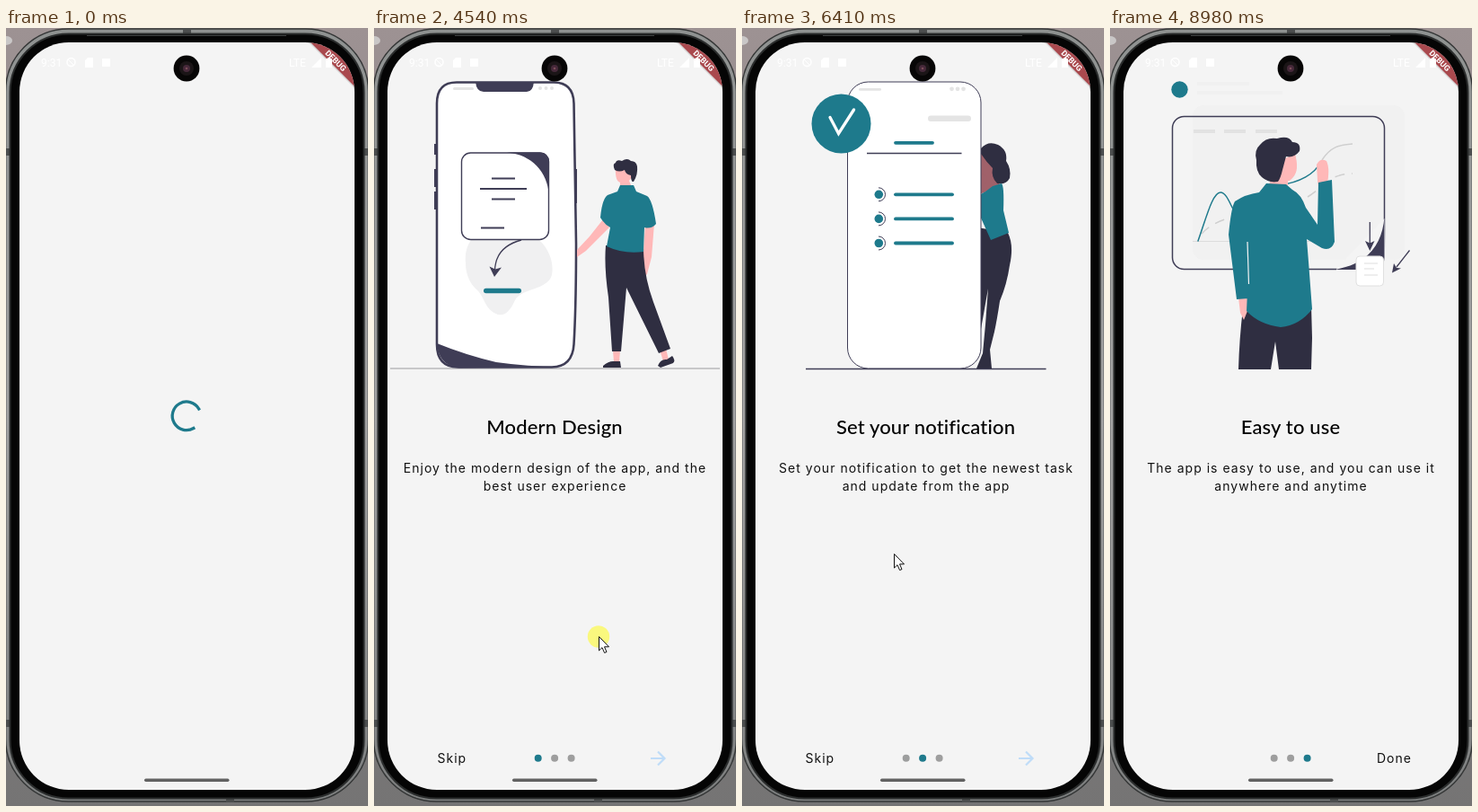
Write an HTML page that moves like this. It is 403 by 866 pixels and loops after 9.64 s.

```html
<!DOCTYPE html>
<html lang="en">
<head>
<meta charset="utf-8">
<title>Onboarding</title>
<style>
  html, body { margin: 0; width: 100%; height: 100%; overflow: hidden; background: #8a8485; }
  svg { display: block; width: 100vw; height: 100vh; }
  .title { font: 500 22px Lato, sans-serif; letter-spacing: .15px; text-anchor: middle; }
  .body { font: 400 14px Inter, sans-serif; letter-spacing: 1.02px; fill: #111; }
  .mid { text-anchor: middle; }
  .teal { fill: #1e7a8c; }
  .dark { fill: #3f3d56; }
  .navy { fill: #2f2e41; }
  .skin { fill: #ffb8b8; }
  .tan { fill: #a0616a; }
  .pale { fill: #e4e4e4; }
  .ink { stroke: #3f3d56; fill: none; }
  .tealLine { stroke: #1e7a8c; fill: none; stroke-linecap: round; }
  .grayLine { stroke: #cfcfcf; fill: none; }
</style>
</head>
<body>
<svg viewBox="0 0 403 866" preserveAspectRatio="none">
  <defs>
    <linearGradient id="desk" x2="0" y2="1">
      <stop offset="0" stop-color="#9d9293"/>
      <stop offset="1" stop-color="#757474"/>
    </linearGradient>
    <linearGradient id="metal" x2="0" y2="1">
      <stop offset="0" stop-color="#8e9190"/>
      <stop offset=".5" stop-color="#a3a3a3"/>
      <stop offset="1" stop-color="#7d7f7f"/>
    </linearGradient>
    <clipPath id="screen"><rect x="15" y="16" width="373" height="832" rx="55"/></clipPath>
  </defs>

  <!-- device -->
  <rect width="403" height="866" fill="url(#desk)"/>
  <ellipse cx="0" cy="14" rx="7" ry="5" fill="#c9c7c7"/>
  <rect x="-.5" y="1" width="404" height="860" rx="70" fill="url(#metal)" stroke="#353737" stroke-width="1.5"/>
  <path d="M197 0h9v6h-9zM0 134h5v8h-5zM398 134h5v8h-5zM0 770h5v8h-5zM398 770h5v8h-5zM245 857h9v5h-9z" fill="#4c4e4e"/>
  <rect x="4.500" y="6.500" width="394" height="851" rx="65" fill="#050505" stroke="#2b2d2d" stroke-width="2"/>
  <path d="M90 8.500h222" stroke="#3d4040"/>

  <g clip-path="url(#screen)">
    <rect x="15" y="16" width="373" height="832" fill="#f4f4f4"/>
    <path id="spinner" fill="none" stroke="#1e7a8c" stroke-width="3.300" stroke-linecap="square"/>

    <g id="home">
      <g id="pages">
        <g id="page0">
          <path d="M18 379H385" stroke="#b9b9bb" stroke-width="1.300"/>
          <path class="dark" d="M67 129h3v12h-3zM67 157h3v20h-3zM67 182h3v20h-3zM223 157h3v38h-3z"/>
          <path d="M92 60.500H200Q222 60.500 222.500 84L225 240Q225 310 222.500 352Q221 377 198 377.500H93Q70 377 70 352V84Q70 60.500 92 60.500Z" fill="#fff" stroke="#3f3d56" stroke-width="2.600"/>
          <path class="dark" d="M113 60H178Q177 71 170 71H122Q114 71 113 60ZM70 351Q102 364 136 372Q172 377 205 377L95 378.500Q72 376 70 351Z"/>
          <rect class="pale" x="88" y="66" width="23" height="3" rx="1.500"/>
          <g class="pale"><circle cx="185" cy="67" r="2"/><circle cx="191.500" cy="67" r="2"/><circle cx="198" cy="67" r="2"/></g>
          <path d="M102 262C100 240 112 224 135 225C150 222 170 222 178 232C192 240 201 258 198 275C193 292 165 289 157 303C152 314 146 321 138 319C122 313 124 299 113 290C106 283 102 273 102 262Z" fill="#f0f0f1"/>
          <rect x="97.500" y="139" width="97" height="96.500" rx="10" fill="#fff" stroke="#3f3d56" stroke-width="1.400"/>
          <path class="dark" d="M148 138.500H185Q195 139 195 149V186C193 160 176 141 148 138.500Z"/>
          <path class="ink" stroke-width="2" d="M131 167.500h26M118 179h52M131 190.500h26M119 222.500h26"/>
          <path class="ink" stroke-width="1.300" d="M164 236C145 241 135 253 134.500 270"/>
          <path class="dark" d="M128.500 265.500L134 277L142 266.500L135 268.500Z"/>
          <rect class="teal" x="122" y="289.800" width="42" height="5.400" rx="2.700"/>

          <path class="skin" d="M255 213L240 232L226 247V255L236 248L262 222ZM302 218L299 262Q294 268 296 275Q299 280 304 274L309 255L312 218ZM266 359h8l-1 13h-6zM318 358l7-1l3 12l-6 2z"/>
          <path class="skin" d="M269 155L286 154Q290 165 284 170L287 177H274V172Q268 170 269 155Z"/>
          <path class="navy" d="M268 158Q265 151 269 150Q270 146 276 148Q282 144 286 148Q292 148 293 154Q294 163 289 171Q286 172 286 164Q280 163 279 158Q273 161 268 158Z"/>
          <path class="navy" d="M258 242L300 244Q300 275 311 305L330 357L317 362L281 289L275 360H265L261 300Q256 266 258 242Z"/>
          <path class="teal" d="M274 175H289L292 182L304 187Q310 191 314 218Q309 224 301 222L300 249Q278 252 259 243L263 222Q257 219 252 211Q254 190 260 186L271 182Z"/>
          <path class="navy" d="M255 376Q261 371 266 371H274L275 378H255ZM316 376Q319 368 326 369L332 365Q336 370 333 373L319 378Z"/>
        </g>

        <g id="page1">
          <g transform="translate(-3.5)">
            <path class="ink" stroke-width="1.300" d="M71 379.500H338.500"/>
            <path class="tan" d="M262 139Q275 130 283 144Q288 158 281 164L288 176L262 186Z"/>
            <path class="navy" d="M266 134Q274 125 285 130Q296 136 294 148Q300 157 298 167Q294 175 284 173Q277 166 279 156Q272 149 266 140Z"/>
            <path class="navy" d="M262 222L296 228Q303 242 298 264Q295 285 287 304Q284 324 281 338L276 358L278 379H261L268 362L271 330L274 290L266 335L262 340Z"/>
            <path class="teal" d="M264 186Q272 182 279 176L289 173Q292 176 291 203L297 228L277 236L264 207Z"/>
            <path class="tan" d="M262 164Q271 160 273 167Q273 176 262 179Z"/>
            <rect x="117.500" y="60" width="148.500" height="319" rx="23" fill="#fff" stroke="#3f3d56"/>
            <g class="pale">
              <rect x="130" y="67" width="25" height="2.800" rx="1.400"/>
              <rect x="207" y="97.500" width="48" height="6.500" rx="3.200"/>
              <circle cx="233.500" cy="67.800" r="2.400"/><circle cx="240" cy="67.800" r="2.400"/><circle cx="246.500" cy="67.800" r="2.400"/>
            </g>
            <path class="tealLine" stroke-width="3.800" d="M171 127.800h41"/>
            <path class="ink" stroke-width="1.400" d="M139 139.500h105.500"/>
            <g id="rows"></g>
            <circle class="teal" cx="110.500" cy="106.500" r="33"/>
            <path d="M98 99.500L107.500 117.500L124.500 91" fill="none" stroke="#fff" stroke-width="3.300" stroke-linecap="round"/>
          </g>
        </g>

        <g id="page2">
          <rect x="92" y="86" width="236" height="172" rx="12" fill="#f1f1f1"/>
          <path d="M97 62h58M97 72h95" stroke="#f0f0f0" stroke-width="4"/>
          <circle class="teal" cx="77.500" cy="68.500" r="9.200"/>
          <path d="M93 115h24M127 115h24M162 115h24" stroke="#e2e2e2" stroke-width="4"/>
          <path class="grayLine" stroke-opacity=".6" d="M92 237.500h158"/>
          <path class="grayLine" stroke-width="1.500" stroke-dasharray="11 8" d="M102 229Q118 212 145 210M220 188C240 176 242 163 270 162"/>
          <path class="grayLine" stroke-width="1.500" d="M236 147C245 133 254 130 270 129"/>
          <path class="tealLine" stroke-width="1.500" d="M98 237C107 212 114 183 123 183C132 183 136 207 146 214M188 175C212 172 228 162 234 150"/>
          <rect class="ink" x="69.500" y="98.500" width="236" height="170" rx="13" stroke-width="1.500"/>
          <path d="M305.500 212L308 270L252 270V268Z" fill="#f4f4f4"/>
          <path class="dark" d="M305.500 210V256Q305 268 293 269H249C283 264 303 245 305.500 210Z"/>
          <rect x="274" y="254" width="30.500" height="33" rx="4" fill="#fff" stroke="#e0e0e0"/>
          <path class="grayLine" stroke-opacity=".7" d="M283 262h15M283 268h11M283 275h15"/>
          <path class="ink" stroke-width="1.300" d="M289.300 216V240M333.500 247.500L319 266"/>
          <path class="dark" d="M284 237L289.300 248L294.500 237L289.300 239.500ZM316 262L314 272.500L324 267.500L319 267Z"/>

          <path class="navy" d="M148 312L224 308L225 345L224 380H188L184 349L179 380H143Q144 345 148 312Z"/>
          <path class="skin" d="M143 300H154L153 315L149 325L145 317ZM231 170L230 152Q234 144 241 148Q245 156 242 173L232 176Z"/>
          <path class="skin" d="M183 151L206 140Q211 158 204 166Q200 171 198 170V179H176Z"/>
          <path class="navy" d="M163 147Q160 136 167 130Q174 121 186 123Q199 119 203 127Q213 127 211 137Q205 145 196 143L192 158Q190 167 187 171Q177 173 169 166Q162 160 163 147Z"/>
          <path class="teal" d="M174 173L196 174L203 180Q213 185 218 200L231 219L232 172L247 169L250 238Q246 249 236 245L219 235L221 260L225 313Q211 331 190 333Q166 330 152 315L155 250L154 301L141 302L132 230Q135 199 139 193Q151 185 166 183Z"/>
          <path d="M153 238L154.500 285" stroke="#f4f4f4" stroke-width="1.200"/>
        </g>
      </g>

      <g id="dots"></g>
      <g id="skip">
        <text class="body" x="70.500" y="818">Skip</text>
        <path d="M308 813h15M316 805.500l7.500 7.500l-7.500 7.500" fill="none" stroke="#bfdcf8" stroke-width="2.200"/>
      </g>
      <text id="done" class="body" x="297" y="818">Done</text>
    </g>

    <!-- system overlay -->
    <path d="M333 10L394 71V49L355 10Z" fill="#000" opacity=".12" transform="translate(-1 1)"/>
    <path d="M333 10L394 71V52L352 10Z" fill="#a9494e"/>
    <g fill="#fff">
      <text x="39" y="42.500" font-family="Roboto, sans-serif" font-size="12">9:31</text>
      <text x="315" y="42.500" font-family="Roboto, sans-serif" font-size="12">LTE</text>
      <circle cx="72.500" cy="38" r="4.500" fill="none" stroke="#fff" stroke-width="1.500"/>
      <path d="M69 35l7 7" stroke="#fff"/>
      <path d="M88 36l3-3h6v11h-9zM107 34h9v9h-9zM351 33v11h-11zM356 34h2v-1h3v1h2v10h-7z"/>
      <text transform="translate(367 36.500) rotate(45)" y="3" class="mid" font-family="Roboto, sans-serif" font-size="9" font-weight="700">DEBUG</text>
    </g>
    <rect x="154" y="835.500" width="94.500" height="3.500" rx="1.700" fill="#626262"/>
  </g>

  <circle cx="201" cy="45" r="14.400" fill="#070606"/>
  <circle cx="201" cy="45" r="8" fill="#1b1517"/>
  <circle cx="201" cy="45" r="4" fill="#46293a"/>
  <circle cx="201" cy="45" r="1.300" fill="#7a4c58"/>

  <g id="cursor">
    <circle id="press" r="12.200" fill="#faf87e"/>
    <path d="M.5 0V15.500L4 12.200L6.600 18L9 17L6.500 11.300H11.500Z" fill="#fff" stroke="#111"/>
  </g>
</svg>

<script>
const LOOP = 9640, STEP = 69.3, PITCH = 373.5, CX = 201;
const $ = id => document.getElementById(id);
const clamp = (v, lo = 0, hi = 1) => Math.min(hi, Math.max(lo, v));
const mix = (a, b, k) => a + (b - a) * k;

// page copy, list rows and page dots
const copy = [
  ['Modern Design', 'Enjoy the modern design of the app, and the', 'best user experience'],
  ['Set your notification', 'Set your notification to get the newest task', 'and update from the app'],
  ['Easy to use', 'The app is easy to use, and you can use it', 'anywhere and anytime']
];
copy.forEach(([title, a, b], i) => {
  const page = $('page' + i);
  page.setAttribute('transform', `translate(${i * PITCH})`);
  page.insertAdjacentHTML('beforeend',
    `<text class="title" x="${CX}" y="452">${title}</text>
     <text class="body mid" x="${CX + .5}" y="494.500">${a}</text>
     <text class="body mid" x="${CX + .5}" y="514.500">${b}</text>`);
});
$('rows').innerHTML = [185.3, 212.4, 239.5].map(y =>
  `<circle class="teal" cx="152.300" cy="${y}" r="4.800"/>
   <path class="ink" d="M152 ${y - 7.500}a7.500 7.500 0 0 1 0 15"/>
   <path class="tealLine" stroke-width="3.800" d="M171 ${y}h63"/>`).join('');
$('dots').innerHTML = [182.7, 201.1, 219.6].map(x => `<circle cx="${x}" cy="812.800" r="4"/>`).join('');
const dots = [...$('dots').children];

// cursor keys: time, x, y, linear
const keys = [
  [3160, 341, 848], [3640, 303, 684], [3850, 302, 683], [4130, 295, 677.5],
  [4300, 295, 677.5], [4510, 250, 677.5], [4545, 250, 677.5], [4900, 112, 640],
  [5480, 351, 606], [5645, 351, 606], [5928, 169, 585.5, 1], [6480, 169, 585.5],
  [7150, 272, 592], [7250, 272, 592], [7553, 84, 573.5, 1], [8270, 84, 573.5], [8950, 150, 880]
];

function cursorAt(t) {
  const i = keys.findIndex(k => k[0] > t);
  if (i < 0) return keys[keys.length - 1].slice(1);
  if (!i) return keys[0].slice(1);
  const a = keys[i - 1], b = keys[i];
  const u = (t - a[0]) / (b[0] - a[0]);
  const k = b[3] ? u : u * u * (3 - 2 * u);
  return [mix(a[1], b[1], k), mix(a[2], b[2], k)];
}

// overdamped page spring: distance left after ms, released at 650 px/s
function spring(ms, gap) {
  const slow = 9.07, fast = 22, s = ms / 1000;
  const b = (650 - slow * gap) / (fast - slow);
  return (gap - b) * Math.exp(-slow * s) + b * Math.exp(-fast * s);
}

function scrollAt(t) {
  const x = cursorAt(t)[0];
  if (t < 4530) return 0;
  if (t < 5560) return Math.max(0, 250 - x);
  if (t < 5928) return 351 - x;
  if (t < 7250) return PITCH - spring(t - 5928, PITCH - 182);
  if (t < 7553) return PITCH + Math.max(0, 260 - x);
  return 2 * PITCH - spring(t - 7553, PITCH - 176);
}

// cubic-bezier(.4, 0, .2, 1)
function fastOutSlowIn(x) {
  let lo = 0, hi = 1, s = .5;
  for (let i = 0; i < 20; i++) {
    s = (lo + hi) / 2;
    const r = 1 - s;
    if (1.2 * r * r * s + .6 * r * s * s + s ** 3 < x) lo = s; else hi = s;
  }
  return s * s * (3 - 2 * s);
}

function drawSpinner(t) {
  const u = 655 + Math.min(Math.floor(t / 67) * 67, 1550);
  const c = u / 1333 % 1;
  const head = fastOutSlowIn(clamp(c * 2)), tail = fastOutSlowIn(clamp(c * 2 - 1));
  const from = Math.PI * (-.5 + 1.5 * tail + 2 * (u / 2222) + .5 * (u / 1333));
  const sweep = Math.max(1.5 * Math.PI * (head - tail), .001);
  const at = a => `${CX + 15.8 * Math.cos(a)} ${431.8 + 15.8 * Math.sin(a)}`;
  $('spinner').setAttribute('d',
    `M${at(from)}A15.800 15.800 0 ${+(sweep > Math.PI)} 1 ${at(from + sweep)}`);
}

const show = (id, on) => $(id).setAttribute('visibility', on ? 'inherit' : 'hidden');

function draw(time) {
  const t = 4330 + Math.floor((time - 4330) / STEP) * STEP;
  show('spinner', time < 1970);
  show('home', time >= 2370);
  show('cursor', time >= 3160 && time < 8980);
  if (time < 1970) drawSpinner(time);

  const scroll = scrollAt(t), page = scroll / PITCH;
  $('pages').setAttribute('transform', `translate(${-scroll})`);
  dots.forEach((dot, i) => {
    const k = clamp(1 - Math.abs(page - i));
    dot.setAttribute('fill', `rgb(${mix(158, 30, k)},${mix(158, 122, k)},${mix(158, 140, k)})`);
  });
  show('skip', time >= 2370 && page < 1.5);
  show('done', time >= 2370 && page >= 1.5);

  const [x, y] = cursorAt(t);
  $('cursor').setAttribute('transform', `translate(${x} ${y})`);
  show('press', (t >= 4530 && t < 5928) || (t >= 7220 && t < 7553));
}

const start = performance.now();
function tick() {
  draw((performance.now() - start) % LOOP);
  requestAnimationFrame(tick);
}
tick();
</script>
</body>
</html>
```
